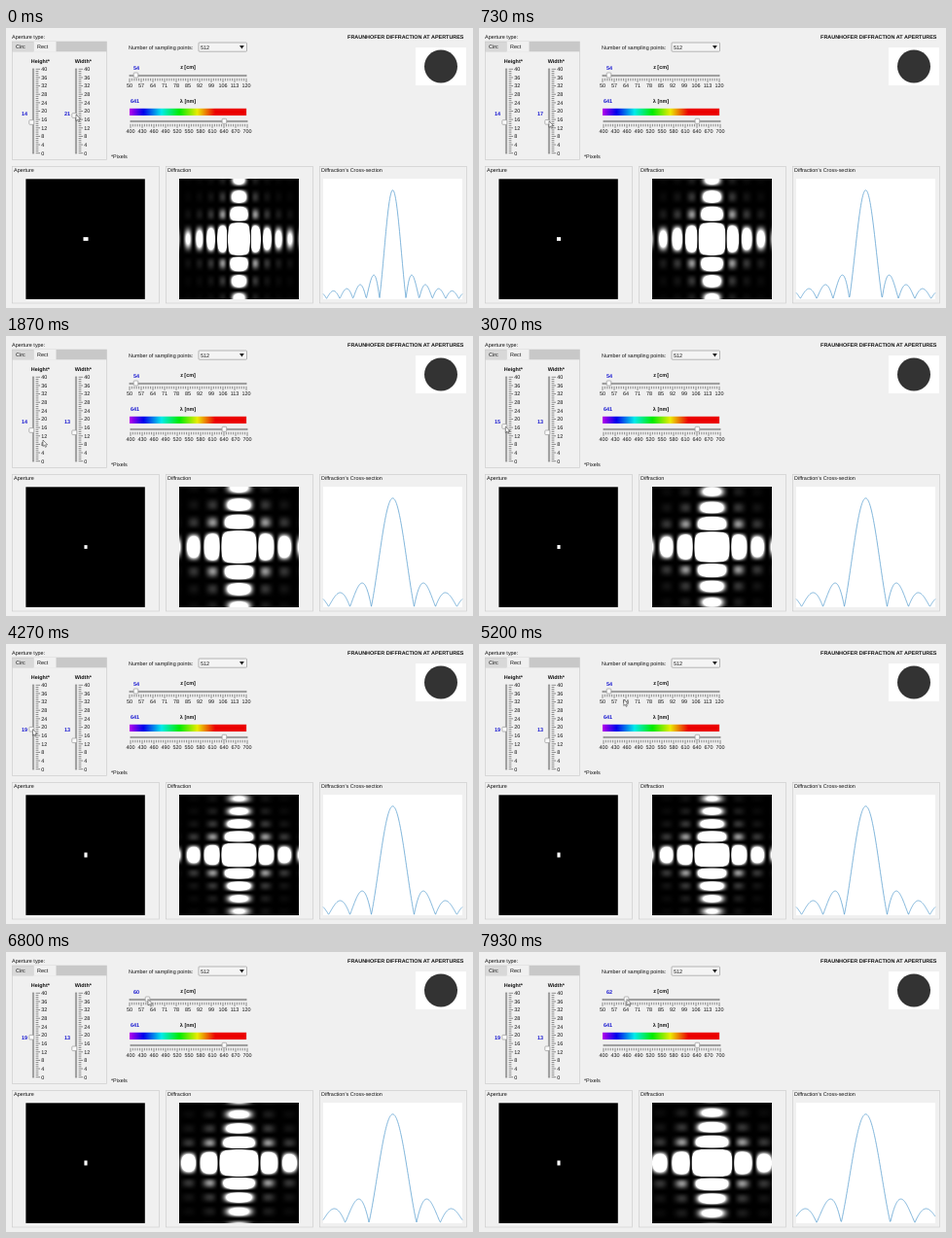
Recreate the animation shown at these times as an HTML page with a canvas. Size 480x288 px, loop 8000 ms.

```html
<!DOCTYPE html>
<html lang="en">
<head>
<meta charset="utf-8">
<title>Fraunhofer diffraction at apertures</title>
<style>
  html, body { margin: 0; width: 100%; height: 100%; overflow: hidden; background: #f0f0f0; }
  svg, canvas { position: absolute; left: 0; top: 0; }
  canvas { left: 178px; top: 155px; }
  text { font: 5.45px "Liberation Sans", Arial, sans-serif; fill: #111; text-rendering: geometricPrecision; }
  .b { font-weight: bold; }
  .v { font-weight: bold; fill: #1515d0; }
</style>
</head>
<body>
<svg id="ui" width="480" height="288" viewBox="0 0 480 288"></svg>
<canvas id="pattern" width="123" height="124"></canvas>
<script>
const LOOP = 8000;
const ui = document.getElementById('ui');
const ctx = document.getElementById('pattern').getContext('2d');

function set(el, attrs) {
  for (const k in attrs) el.setAttribute(k, attrs[k]);
  return el;
}
function add(tag, attrs, content = '') {
  const el = set(document.createElementNS('http://www.w3.org/2000/svg', tag), attrs);
  el.textContent = content;
  return ui.appendChild(el);
}
const rect = (x, y, width, height, fill, stroke = 'none', rx = 0) =>
  add('rect', { x, y, width, height, fill, stroke, rx, 'stroke-width': 0.7 });
const label = (x, y, s, cls = '', anchor = 'start') =>
  add('text', { x, y, class: cls, 'text-anchor': anchor }, s);
const path = (d, stroke, width, fill = 'none') =>
  add('path', { d, stroke, 'stroke-width': width, fill });
const thumb = (w, h) => rect(-w / 2, -h / 2, w, h, '#fafafa', '#999', 0.8);
const place = (el, [x, y]) => set(el, { transform: `translate(${x} ${y})` });

function verticalSlider(x, name) {
  label(x + 7.3, 35.6, name, 'b', 'middle');
  rect(x - 0.7, 42, 1.4, 87, '#c4c4c4', '#888');
  let d = '';
  for (let i = 0; i <= 40; i++) {
    const y = 128.7 - i * 2.16, major = i % 4 === 0;
    d += `M${x + 2.6} ${y}h${major ? 4.4 : 2.8}`;
    if (major) label(x + 8.2, y + 1.9, i);
  }
  path(d, '#444', 0.6);
}

function horizontalSlider(x, y, from, step) {
  rect(x, y - 0.7, 120, 1.4, '#c4c4c4', '#888');
  let d = '';
  for (let i = 0; i <= 50; i++) {
    const px = x + i * 2.4, major = i % 5 === 0;
    d += `M${px} ${y + 2.8}v${major ? 4 : 2.6}`;
    if (major) label(px, y + 12.2, from + step * i / 5, '', 'middle');
  }
  path(d, '#444', 0.6);
}

function panel(x, title) {
  rect(x + 0.5, 142.5, 151, 140.5, 'none', '#cdcdcd');
  label(x + 2, 148, title);
}

// Aperture controls
label(6, 11, 'Aperture type:');
rect(6.5, 14, 97, 121.5, '#f0f0f0', '#cdcdcd');
rect(6.5, 14, 97, 10.3, '#c8c8c8');
rect(7, 14.4, 21, 9.9, '#d8d8d8');
rect(28.5, 14, 23, 10.6, '#f0f0f0');
label(10, 20.9, 'Circ');
label(32, 20.9, 'Rect');
label(108, 133.8, '*Pixels');
verticalSlider(28, 'Height*');
verticalSlider(72, 'Width*');
const hText = label(16, 89.5, '', 'v');
const wText = label(60, 89.5, '', 'v');

// Sampling, distance and wavelength
label(126, 21.6, 'Number of sampling points:');
rect(198, 15, 49.5, 9.2, '#f4f4f4', '#999', 0.8);
label(200, 21.5, '512');
path('M240 18h4.8l-2.4 3.4z', 'none', 0, '#222');
label(187, 41.5, 'z [cm]', 'b', 'middle');
label(187, 77.2, 'λ [nm]', 'b', 'middle');
const zText = label(131, 43, '', 'v');
label(128, 77, '641', 'v');
for (let i = 0; i < 120; i++)
  rect(127 + i, 82.8, 1.1, 7.2, `hsl(${Math.max(0, 285 - 3.25 * i)} 100% 46%)`);
horizontalSlider(127, 49, 50, 7);
horizontalSlider(128, 96, 400, 30);

// Heading and emblem
label(470.5, 11.2, 'FRAUNHOFER DIFFRACTION AT APERTURES', 'b', 'end');
rect(421, 20, 52, 39, '#fff');
add('circle', { cx: 447, cy: 39.5, r: 17, fill: '#333' });

// Plots
panel(6, 'Aperture');
panel(164, 'Diffraction');
panel(322, "Diffraction's Cross-section");
rect(20.4, 155.3, 122.4, 123.6, '#000');
rect(326, 155, 143, 124, '#fff');
const hole = rect(0, 0, 0, 0, '#fff');
const curve = set(path('', '#62a4d2', 0.8), { 'stroke-linejoin': 'round' });

const hThumb = thumb(5, 4.6), wThumb = thumb(5, 4.6), zThumb = thumb(4.6, 5);
place(thumb(4.6, 5), [224.4, 95.8]);
const cursor = path('M0 0V6.5L1.5 5.2 2.5 7.4 3.5 7 2.6 4.8H4.6z', '#222', 0.5, '#fff');

const clamp = (v, lo, hi) => Math.min(hi, Math.max(lo, v));
const ramp = (t, from, to) => clamp((t - from) / (to - from), 0, 1);
const count = (t, from, every, max) => clamp(Math.floor((t - from) / every), 0, max);
const mix = (a, b, p) => a.map((v, i) => v + (b[i] - v) * p);
const sinc = u => Math.abs(u) < 1e-6 ? 1 : Math.sin(Math.PI * u) / (Math.PI * u);

function drawPlots(w, h, z) {
  const { width: cols, height: rows } = ctx.canvas;
  const sx = 4.55 * z / w, sy = 4.55 * z / h;   // spacing of the dark fringes
  const img = ctx.createImageData(cols, rows);
  for (let y = 0, i = 0; y < rows; y++) {
    const iy = 260 * sinc((y + 0.5 - rows / 2) / sy) ** 2;
    for (let x = 0; x < cols; x++, i += 4) {
      const v = 255 * iy * sinc((x + 0.5 - cols / 2) / sx) ** 2;
      img.data.set([v, v, v, 255], i);
    }
  }
  ctx.putImageData(img, 0, 0);

  let d = '';
  for (let x = 326; x <= 469; x += 0.5) {
    const y = 278.3 - 111.5 * Math.abs(sinc((x - 397.5) / (sx * 143 / 123)));
    d += `${d ? 'L' : 'M'}${x} ${y.toFixed(2)}`;
  }
  set(curve, { d });

  const width = w * 0.24, height = h * 0.24 + 0.4;
  set(hole, { x: 82 - width / 2, y: 217 - height / 2, width, height });
}

let shown = '';
function render(t) {
  const w = 21 - count(t, 0, 175, 8);
  const h = 14 + count(t, 2670, 240, 5);
  const z = 54 + count(t, 6000, 133, 6) + count(t, 7500, 170, 2);
  const key = [w, h, z].join();
  if (key !== shown) {
    shown = key;
    drawPlots(w, h, z);
    wText.textContent = w;
    hText.textContent = h;
    zText.textContent = z;
  }

  // The handles run ahead of the computed values
  const wy = 90 + 9.3 * ramp(t, 0, 1000);
  const hy = 97 - 9.3 * ramp(t, 2670, 3600);
  const zx = 133.5 + 12 * ramp(t, 5700, 6800) + 6 * ramp(t, 7270, 7930);
  place(wThumb, [70.3, wy]);
  place(hThumb, [26.3, hy]);
  place(zThumb, [zx, 48.5]);

  let p = [72, wy - 1];
  p = mix(p, [38, 107], ramp(t, 1730, 1870));
  p = mix(p, [27.3, hy], ramp(t, 1870, 2600));
  p = mix(p, [154, 60], ramp(t, 4270, 5070));
  p = mix(p, [zx + 0.5, 48.5], ramp(t, 5130, 5400));
  place(cursor, p);
}

const start = performance.now();
function tick() {
  render((performance.now() - start) % LOOP);
  requestAnimationFrame(tick);
}
tick();
</script>
</body>
</html>
```
